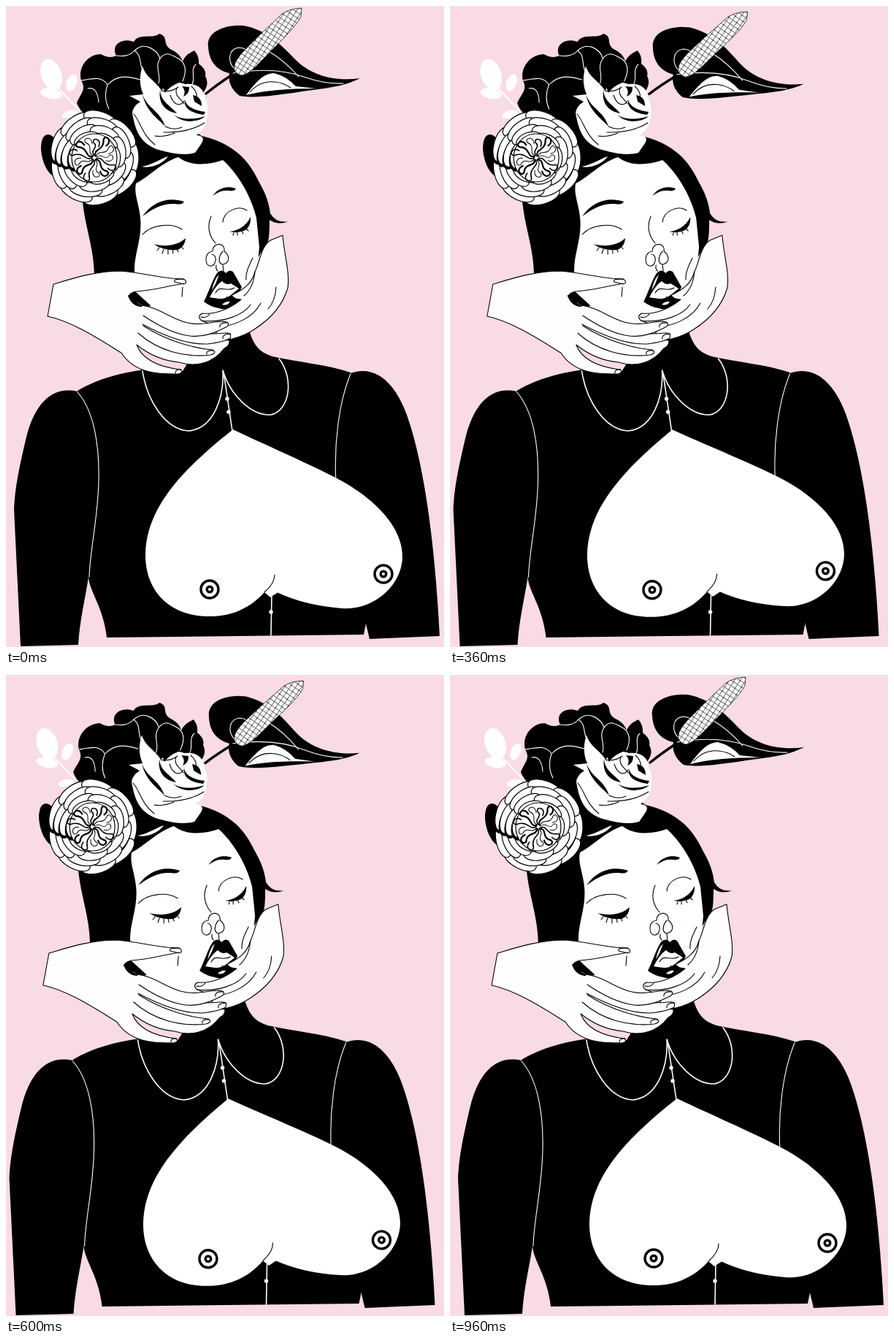
These frames come from a looping animation (600 px wide and 878 px high, 1040 ms). An HTML page:

```html
<!DOCTYPE html>
<html lang="en">
<head>
<meta charset="utf-8">
<title>Portrait with flowers</title>
<style>
html, body { margin: 0; width: 100%; height: 100%; overflow: hidden; background: #f8dbe3; }
svg { display: block; width: 600px; height: 878px; }
path, circle, ellipse { stroke-linecap: round; stroke-linejoin: round; }
.w { fill: #fff; }
.skin { fill: #fefefe; stroke: #000; stroke-width: 1.1; }
.line { fill: none; stroke: #000; stroke-width: 1.1; }
.vein { fill: none; stroke: #fff; stroke-width: 1.1; }
.bold { fill: none; stroke: #000; stroke-width: 3.4; }
</style>
</head>
<body>
<svg viewBox="0 0 600 878">
<defs>
  <pattern id="net" width="9" height="9" patternUnits="userSpaceOnUse" patternTransform="rotate(-12)">
    <path d="M0,0L9,9M9,0L0,9" class="line" style="stroke-width:.8"/>
  </pattern>
</defs>

<g id="leaves" class="w">
  <ellipse cx="62" cy="94" rx="14" ry="22" transform="rotate(-18 62 94)"/>
  <ellipse cx="90" cy="105" rx="7" ry="12" transform="rotate(22 90 105)"/>
  <ellipse cx="62" cy="120" rx="15" ry="7" transform="rotate(10 62 120)"/>
  <ellipse cx="88" cy="148" rx="11" ry="5" transform="rotate(-12 88 148)"/>
  <path d="M72,113L102,145" class="vein" style="stroke-width:2"/>
</g>

<g id="head">
  <path d="M104,255C106,300 121,328 121,372L165,385L172,408L195,412L345,345L359,322Q361,315 361,293Q373,301 387,295Q370,298 362,284C359,260 349,246 343,234C329,206 306,187 268,178L200,130L130,130Z"/>
  <path class="w" d="M176,364C175,340 187,318 184,290C182,270 175,258 178,243C196,234 212,215 236,207C252,220 278,218 297,211C320,232 336,262 343,290L347,330L340,400L270,455L200,412L176,390Z"/>
  <path class="w" d="M186,220C202,217 212,209 222,206C216,215 200,223 186,220Z"/>
  <path d="M187,288C201,268 222,261 244,268Q241,273 232,271C214,270 202,277 187,288Z"/>
  <path d="M283,260C291,249 303,246 315,250Q313,254 306,253C296,252 291,255 283,260Z"/>
  <path class="line" d="M187,313C198,300 226,296 241,306M297,296C298,281 318,272 330,280M281,288C275,301 278,315 287,325M338,345C332,357 328,366 329,375M242,385L241,398"/>
  <path d="M202,326C217,330 234,329 246,318Q245,330 235,334Q217,336 202,326ZM306,309C317,308 329,302 335,289Q336,301 328,307Q317,312 306,309Z"/>
  <path class="line" d="M210,331l-3,4m9,-2l-2,6m8,-5v6m6,-7l1,6m5,-7l2,5m4,-8l3,4M312,311l-1,3m6,-4v4m6,-6l2,4m4,-7l3,3"/>
  <path class="line" d="M275,353C272,343 276,337 283,336C283,328 290,325 295,327Q300,330 299,336C307,342 306,350 300,353Q294,356 292,349Q292,341 297,336M275,353Q280,359 285,354C289,347 287,341 282,340M288,355Q287,360 290,363M297,355L298,363"/>
  <path d="M271,405C279,390 284,370 291,364Q297,360 301,366Q306,360 311,364L323,385C318,392 325,398 323,408Q317,412 309,410Q302,418 292,414Q280,412 271,405Z"/>
  <path class="w" d="M279,399C285,387 291,380 296,377Q302,383 308,380L319,387L308,396C299,403 291,401 279,399ZM282,390Q285,374 292,368Q288,380 282,390ZM296,409Q301,404 307,405Q303,411 296,409Z"/>
  <path class="line" d="M287,393C293,381 302,393 313,386M302,398l5,7"/>
</g>

<g id="peony">
  <path d="M97,133C101,121 111,115 103,102C98,84 112,66 130,66Q142,73 151,68C143,52 160,43 175,49C183,36 201,46 210,38C223,42 214,51 225,59Q239,65 242,76C245,68 251,64 258,61Q265,69 264,79Q275,87 273,96Q280,108 268,121L180,160L110,150Q100,142 97,133Z"/>
  <path class="vein" d="M103,102C117,100 131,95 139,108C151,95 164,95 184,101M139,108Q133,125 141,141M151,68C160,69 169,69 176,61C188,69 181,84 190,92M176,61C190,48 207,60 211,72M211,72C219,60 228,68 238,73M211,72C203,84 213,94 209,106M238,73C247,80 247,91 242,103M260,80C252,87 260,99 255,107M112,113Q125,110 127,132"/>
</g>

<g id="bodice">
  <path d="M98,527C130,508 160,503 188,498L242,500L270,455L332,440C339,468 350,475 365,480C400,488 440,491 472,502L493,846L490,861L138,865C133,822 114,802 113,782Z"/>
  <path d="M98,528C58,519 38,552 28,590C16,640 12,665 11,690L20,877L99,875C101,840 109,810 113,782L128,640Z"/>
  <path d="M472,503C506,491 533,516 549,560C574,630 588,745 594,863L498,867L493,846L450,640Z"/>
  <path class="vein" d="M98,529C121,555 128,603 127,650C126,702 115,745 114,782M472,504C456,542 449,600 452,652"/>
  <path class="vein" style="stroke-width:1.6" d="M187,500C193,540 218,580 250,582C285,579 299,535 297,499C307,533 336,561 362,560C389,555 395,510 374,483M298,501L310,582M364,806L363,862"/>
  <g class="w"><circle cx="303" cy="538" r="2.7"/><circle cx="305" cy="556" r="2.7"/><circle cx="363" cy="830" r="2.7"/></g>
</g>

<g id="heart">
  <path fill="#ddd" d="M354,803L368,790L373,803L362,810Z"/>
  <path class="w" d="M311,580C350,599 420,629 455,648C492,667 545,708 543,757C540,798 500,828 460,825Q409,821 371,803L362,809L354,803C335,824 310,837 275,836C223,835 190,800 191,750C193,690 235,640 311,580Z"/>
  <path class="line" d="M368,779Q368,791 354,803"/>
  <g class="bold">
    <circle cx="279" cy="799" r="12"/><circle cx="279" cy="799" r="3.8"/>
    <circle cx="517" cy="778" r="12"/><circle cx="517" cy="778" r="3.8"/>
  </g>
</g>

<g id="hands">
  <path class="skin" d="M362,321L379,314C381,340 389,365 386,386C380,407 365,427 340,443C320,456 298,460 283,457L292,440L268,431Q261,425 269,421C290,423 310,412 322,402Q312,402 309,396C325,389 337,380 341,364C348,350 349,330 362,321Z"/>
  <path class="line" d="M268,431C295,434 324,425 335,409M291,440C309,438 337,430 349,407M341,364Q339,386 326,397M279,422Q275,428 267,426M370,385Q369,404 359,415"/>
  <path class="skin" d="M65,381C92,373 122,363 158,363C185,365 216,374 242,374Q248,375 246,380C225,382 204,390 178,391Q169,393 168,398L190,412C220,424 255,455 306,458Q307,465 299,469C283,490 259,495 237,488Q205,485 179,464C186,483 207,494 239,498Q244,502 236,504C213,504 177,505 158,475C130,458 91,432 57,425Z"/>
  <path d="M167,396C178,397 174,408 192,412Q172,414 167,396Z"/>
  <path class="skin" d="M181,448C208,472 244,482 280,478Q290,475 283,471C260,469 222,460 188,438"/>
  <path class="skin" d="M187,436C217,452 249,464 276,463Q299,460 307,455Q310,447 300,448C276,450 238,450 204,432"/>
  <path class="skin" d="M186,410C208,413 223,426 245,433C265,439 284,432 298,432Q308,433 303,439C286,448 270,454 252,452C229,449 207,437 188,424"/>
  <path class="line" d="M244,374Q229,373 231,378L244,381M304,434Q292,433 293,440M308,449Q296,449 297,456M284,472Q274,471 275,477M240,498Q232,497 232,503"/>
</g>

<g id="rose"></g>

<g id="bud">
  <path class="w" d="M187,82C191,98 207,104 213,116C221,105 235,103 245,107C260,105 271,112 272,125Q279,139 275,155Q274,168 261,177Q274,178 268,188L259,201C240,206 220,200 206,196C188,188 179,178 174,152Q170,140 184,131L169,123L188,121C182,107 183,95 187,82Z"/>
  <path d="M187,121C194,141 211,143 218,165C206,152 192,144 187,121ZM211,115C212,131 224,135 234,147C221,145 208,136 211,115ZM215,111Q224,103 237,105Q224,110 218,119ZM241,110Q247,116 243,124Q251,121 251,111ZM256,122Q268,124 268,137L258,131ZM245,128C247,139 260,143 273,145L271,149C255,147 243,141 245,128ZM230,149C240,156 258,156 273,151Q265,158 250,158Q238,157 230,149Z"/>
  <path class="line" d="M175,148C184,158 186,176 204,190M204,178Q216,180 231,174M213,116Q225,119 236,111M225,122C229,135 238,139 244,130M234,112C230,123 239,126 244,134M254,110Q263,118 261,127M218,165Q230,171 241,166M216,173Q250,174 272,160"/>
</g>

<g id="lily">
  <path class="bold" d="M274,120Q290,107 310,94"/>
  <path d="M277,56C274,35 300,25 326,27C357,33 376,52 395,72C416,94 448,104 485,99C460,112 430,113 400,118C370,122 342,127 320,123Q303,110 306,92C285,87 278,72 277,56Z"/>
  <path class="w" d="M329,122C341,106 352,92 367,92Q384,96 397,110L425,113C385,113 352,116 329,122Z"/>
  <path class="line" d="M334,118Q348,102 368,104Q380,105 390,112"/>
  <path class="vein" d="M311,92C352,85 384,88 411,98Q437,107 462,106M312,85C304,76 304,60 318,57Q334,57 326,68M358,61Q381,74 401,97"/>
  <g id="cob"></g>
</g>
</svg>

<script>
const byId = id => document.getElementById(id);
const ellipse = (x, y, rx, ry, turn, fill = '#fff') =>
  `<ellipse cx="${x}" cy="${y}" rx="${rx}" ry="${ry}" transform="rotate(${turn} ${x} ${y})" fill="${fill}" stroke="#000" stroke-width="1.2"/>`;

// Rings of long overlapping petals around a swirl of fine folds.
function drawRose(cx, cy) {
  let out = ellipse(63, 205, 13, 29, -14, '#000') + ellipse(cx, cy, 57, 61, 0);
  for (let ring = 0; ring < 4; ring++) {
    const r = 50 - ring * 8.5, n = 9 - ring;
    for (let i = 0; i < n; i++) {
      const a = (i + ring * .37) / n * 2 * Math.PI;
      const x = cx + r * Math.cos(a), y = cy + r * 1.06 * Math.sin(a);
      const length = r * 4 / n + 2, turn = a * 180 / Math.PI + 90 + 9 * Math.sin(i * 2 + ring);
      if ((i + ring) % 4 == 1) out += ellipse(x - 1, y + 3, length, 11, turn, '#000');
      out += ellipse(x, y, length, 11, turn);
    }
  }
  out += ellipse(cx, cy, 31, 33, 0);
  for (let i = 0; i < 13; i++) {
    const reach = 21 + i * 7 % 10;
    out += `<path class="line" style="stroke-width:${1 + i % 3 * .6}" transform="translate(${cx} ${cy}) rotate(${i * 360 / 13})" d="M3,0C10,-9 15,6 ${reach},-4q6,-1 4,6q-3,4 -9,2"/>`;
  }
  return out;
}
byId('rose').innerHTML = drawRose(121, 208);

const cob = 'M313,88C311,74 322,66 340,47L378,11Q390,3 405,3L404,14C398,28 372,52 350,75Q335,92 324,95Q316,95 313,88Z';
byId('cob').innerHTML = `<path class="w" d="${cob}"/><path d="${cob}" fill="url(#net)" stroke="#000" stroke-width=".7"/>`;

const slide = speed => k => `translate(${speed * k} 0)`;
const poses = {
  leaves: slide(-1.9),
  head: slide(-1.95),
  bodice: slide(-2.15),
  hands: slide(-2.05),
  rose: slide(-.95),
  bud: slide(-.3),
  peony: k => `translate(0 40) skewX(${-k}) translate(0 -40)`,
  heart: k => `rotate(${-.39 * k} 315 900)`,
  lily: k => `rotate(${.65 * k} 258 85)`
};

function draw(now) {
  const step = Math.floor(now % 1040 / 120);
  const sway = 4 - Math.abs(4 - step);
  for (const id in poses) byId(id).setAttribute('transform', poses[id](sway));
  requestAnimationFrame(draw);
}
draw(performance.now());
</script>
</body>
</html>
```
